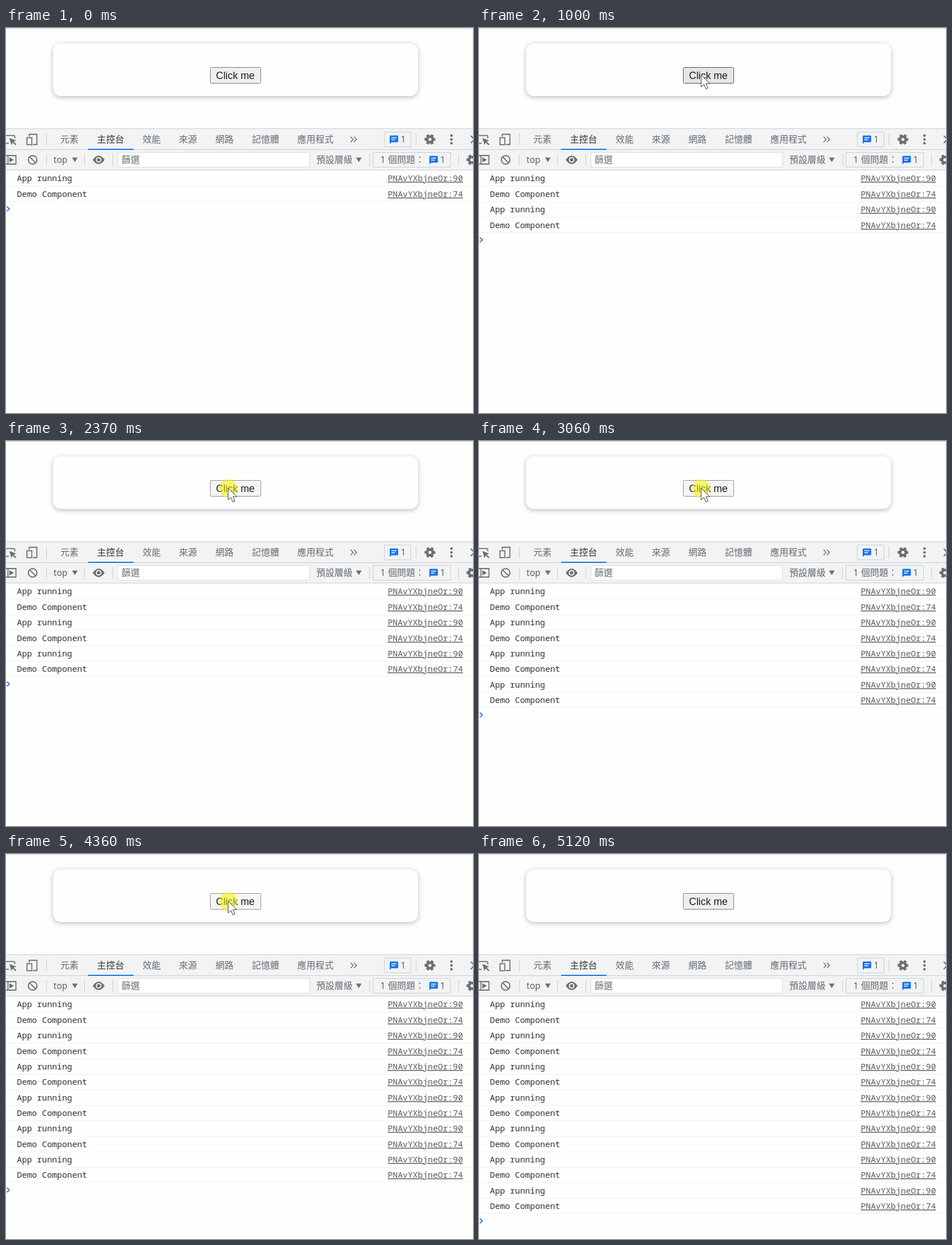
Recreate the animation shown at these times as an HTML page. Size 824 by 679 pixels, loop 5.5 s.

```html
<!DOCTYPE html>
<html lang="zh-Hant">
<head>
<meta charset="utf-8">
<style>
html, body { margin: 0; width: 100%; height: 100%; overflow: hidden; background: #fefefe; }
svg { display: block; }
text { white-space: pre; }
.ui { font: 300 16px "Noto Sans CJK TC", "Noto Sans CJK", "Noto Sans CJK JP", sans-serif; fill: #676b70; }
.num { font: 15.5px "Noto Sans", "Open Sans", sans-serif; fill: #5f6368; }
.log { font: 14.75px "Noto Sans Mono", "DejaVu Sans Mono", monospace; fill: #303134; }
.link { fill: #5c5c5c; text-decoration: underline 1px; }
.line { fill: none; stroke: #cacdd1; }
.icon { fill: none; stroke: #6e6e6e; stroke-width: 2; }
.solid { fill: #6e6e6e; }
#card { filter: drop-shadow(0 2px 4px rgba(0,0,0,.27)); }
#label { font: 17.78px "Liberation Sans", Arial, sans-serif; fill: #1c1c1c; }
</style>
</head>
<body>
<svg id="stage" width="824" height="679" viewBox="0 0 824 679">
  <defs>
    <g id="gear" class="icon">
      <circle r="5" stroke-width="4.5"/>
      <circle r="7.9" stroke-width="3.2" stroke-dasharray="4.7 3.57" stroke-dashoffset="2.35"/>
    </g>
    <g id="chat">
      <path d="M1.5 0h12q1.5 0 1.5 1.5v9q0 1.5-1.5 1.5H3l-3 3V1.5Q0 0 1.5 0z" fill="#1a73e8"/>
      <path d="M3 4h9M3 7.5h6.5" stroke="#fff" stroke-width="1.5"/>
    </g>
    <path id="drop" class="solid" d="M0 0h10l-5 8z"/>
  </defs>

  <!-- page -->
  <path d="M0 .5h824" stroke="#c9c9c9"/>
  <path d="M823.5 1v176" stroke="#ececec"/>
  <rect id="card" x="83" y="27" width="644" height="93" rx="14" fill="#fefefe"/>
  <rect id="button" x="360.5" y="69.5" width="89" height="28" rx="2"/>
  <text id="label" x="370.6" y="90">Click me</text>

  <!-- tab bar -->
  <path d="M0 178h824v73H0z" fill="#f1f3f4"/>
  <path class="line" d="M0 177.5h824M0 214.5h824M0 250.5h824"/>
  <path d="M145 213h80v2h-80z" fill="#1a73e8"/>
  <g class="icon">
    <path d="M0 189.7h13.5q2 0 2 2v3M0 203.3h5" stroke-width="1.8"/>
    <path class="solid" stroke="none" d="M6 194l12 4.5-4.5 2 5 4.6-1.7 1.7-4.9-4.9-2.3 4.5z"/>
    <path d="M41 191.500v-4h13.500v18h-7" stroke-width="1.8"/>
    <rect x="37" y="193.500" width="8.500" height="12.300" stroke-width="1.8"/>
    <path d="M608 191.800l4.500 4.700-4.500 4.700M614 191.800l4.500 4.700-4.500 4.700" stroke-width="1.5"/>
    <path d="M820 190l13 13M820 203l13-13"/>
  </g>
  <g id="tabs"></g>
  <g class="line">
    <path d="M71.5 186v21M723.5 186v21M71.5 222v21M138.5 222v21M188.5 222v21M641.5 222v21M798.5 222v21"/>
    <rect x="667.5" y="183.5" width="47" height="26" rx="1.5"/>
    <rect x="647.5" y="219.5" width="137" height="26" rx="1.5"/>
    <rect x="197.5" y="219.5" width="338" height="26" fill="#fff" stroke="#d9dbde"/>
  </g>
  <use href="#chat" x="677" y="189.5"/>
  <text class="num" x="696.5" y="202">1</text>
  <use href="#gear" x="748" y="196.5"/>
  <path d="M786 189.8h.01M786 196.5h.01M786 203.2h.01" stroke="#6e6e6e" stroke-width="4.4" stroke-linecap="round"/>

  <!-- filter bar -->
  <g class="icon">
    <path d="M0 225h17.5v15H0M3.5 224.5v16" stroke-width="1.8"/>
    <path class="solid" stroke="none" d="M6 228l8 4.5-8 4.5z"/>
    <circle cx="47" cy="232.5" r="7.6"/>
    <path d="M41.6 227.1l10.8 10.8"/>
    <path class="solid" stroke="none" d="M153 232.5q10.5-15 21 0q-10.5 15-21 0z"/>
    <circle cx="163.5" cy="232.5" r="4" fill="#6e6e6e" stroke="#f1f3f4"/>
  </g>
  <text class="num" x="83.8" y="238">top</text>
  <use href="#drop" x="116.5" y="228.5"/>
  <text class="ui" x="204" y="238">篩選</text>
  <text class="ui" x="547.5" y="238">預設層級</text>
  <use href="#drop" x="617.5" y="228.5"/>
  <text class="num" x="660.5" y="238">1</text>
  <text class="ui" x="674" y="238">個問題：</text>
  <use href="#chat" x="747" y="225.5"/>
  <text class="num" x="766" y="238">1</text>
  <use href="#gear" x="822" y="232.5"/>

  <!-- console -->
  <g id="rows"></g>
  <path id="prompt" d="M1.5 -4l4.5 4-4.5 4" fill="none" stroke="#367cf1" stroke-width="2"/>

  <circle id="spot" cx="392" cy="83.5" r="16" fill="#faf500" fill-opacity=".55"/>
  <path id="cursor" d="M0 0V21l4.8-4.6 3.6 8.2 3.6-1.6-3.6-7.9h6.8z" fill="#fff" stroke="#333" stroke-linejoin="round"/>
</svg>
<script>
const LOOP = 5500, STEP = 65.7, PITCH = 27.345;
// press and release times; each release logs one more pair of rows
const clicks = [[930, 1000], [1620, 1690], [2370, 2490], [3060, 3170], [3690, 3800], [4360, 4410]];
// cursor path: time, x, y
const path = [
  [60, 638, 568], [185, 520, 430], [310, 350, 250], [400, 318, 150], [550, 372, 92],
  [630, 372, 92], [860, 392, 83], [4600, 392, 83], [4800, 480, 260], [5060, 790, 655]
];
const $ = id => document.getElementById(id);

function add(parent, name, attrs, text = '') {
  const el = document.createElementNS('http://www.w3.org/2000/svg', name);
  for (const key in attrs) el.setAttribute(key, attrs[key]);
  el.textContent = text;
  parent.append(el);
  return el;
}

const tabs = { 元素: 96, 主控台: 160.5, 效能: 241, 來源: 305, 網路: 369.5, 記憶體: 434, 應用程式: 514 };
for (const name in tabs) {
  const tab = add($('tabs'), 'text', { class: 'ui', x: tabs[name], y: 202 }, name);
  if (name === '主控台') tab.style.fill = '#303134';
}

const rows = Array.from({ length: 14 }, (_, i) => {
  const row = add($('rows'), 'g'), y = Math.round(270.48 + i * PITCH);
  const [text, line] = i % 2 ? ['Demo Component', 74] : ['App running', 90];
  add(row, 'text', { class: 'log', x: 19.3, y }, text);
  add(row, 'text', { class: 'log link', x: 673.5, y }, 'PNAvYXbjneOr:' + line);
  row.rule = add(row, 'path', { d: `M0 ${y + 8.5}h824`, stroke: '#f0f0f0' });
  return row;
});

function position(t) {
  const i = path.findIndex(p => p[0] > t);
  if (i < 0) return path.at(-1).slice(1);
  if (!i) return path[0].slice(1);
  const [a, b] = [path[i - 1], path[i]], k = (t - a[0]) / (b[0] - a[0]);
  return [1, 2].map(n => a[n] + (b[n] - a[n]) * k);
}

const show = (el, on) => el.style.display = on ? '' : 'none';

function draw(t) {
  const visible = t >= 60 && t < 5120;
  const [x, y] = position(60 + Math.floor((t - 60) / STEP + .01) * STEP);
  const pressed = clicks.some(([down, up]) => t >= down && t < up);
  const hover = visible && x > 360 && x < 450 && y > 70 && y < 98;
  const count = 2 + 2 * clicks.filter(c => t >= c[1]).length;

  show($('cursor'), visible);
  show($('spot'), pressed);
  $('cursor').setAttribute('transform', `translate(${x} ${y})`);
  const [fill, stroke] = pressed ? ['#f5f5f5', '#8d8d8d'] : hover ? ['#e5e5e5', '#4f4f4f'] : ['#efefef', '#767676'];
  $('button').setAttribute('fill', fill);
  $('button').setAttribute('stroke', stroke);
  rows.forEach((row, i) => {
    show(row, i < count);
    row.rule.setAttribute('transform', `translate(0 ${i === count - 1 ? -1 : 0})`);
  });
  $('prompt').setAttribute('transform', `translate(0 ${319 + PITCH * (count - 2)})`);
}

const start = performance.now();
(function tick() {
  draw((performance.now() - start) % LOOP);
  requestAnimationFrame(tick);
})();
</script>
</body>
</html>
```
